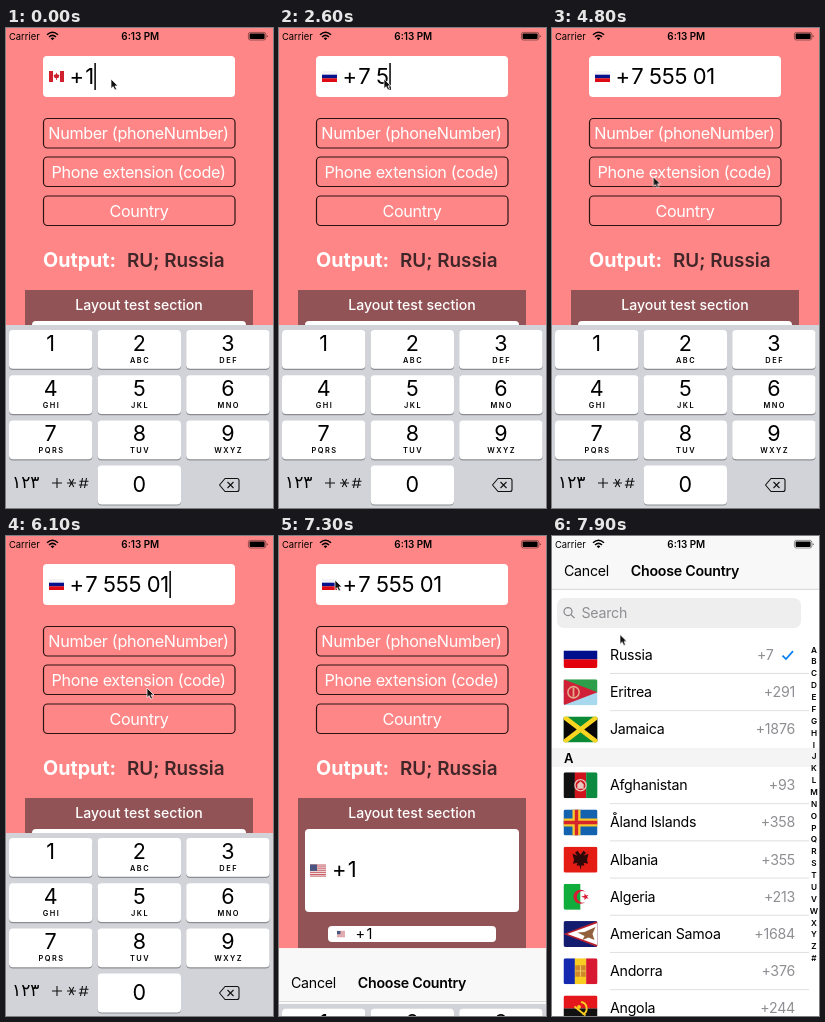
Write an HTML page that moves like this. It is 267 by 480 pixels and loops after 8000 ms.

```html
<!DOCTYPE html>
<html lang="en">
<head>
<meta charset="utf-8">
<title>Phone field</title>
<style>
html, body { margin: 0; width: 100%; height: 100%; overflow: hidden; background: #ff8686; }
svg { display: block; width: 100vw; height: 100vh; }
text { font-family: Inter, Roboto, sans-serif; white-space: pre; }
.mid { text-anchor: middle; }
.end { text-anchor: end; }
.b { font-weight: 600; }
.btn { font-size: 16.2px; letter-spacing: -.35px; fill: #fff; }
.num { font-size: 22px; letter-spacing: -.4px; }
.bar, .row { font-size: 14.2px; letter-spacing: -.25px; }
.code { fill: #8e8e93; }
.key { font-size: 21.5px; }
.abc { font-size: 7.4px; font-weight: 600; letter-spacing: 1.5px; }
.idx { font-size: 8.2px; font-weight: 600; }
#mouse { animation: roam 8s infinite ease-in-out; }
@keyframes roam {
  0%, 43.75% { transform: translate(105px, 51px); }
  51.25% { transform: translate(107px, 106px); }
  58.75% { transform: translate(101px, 146px); }
  65%, 68.75% { transform: translate(105px, 180px); }
  76.25%, 79% { transform: translate(141px, 152px); }
  86.25%, 93.75% { transform: translate(56px, 44px); }
  98.5%, 100% { transform: translate(68px, 98.5px); }
}
</style>
</head>
<body>
<svg viewBox="0 0 267 480" preserveAspectRatio="none">
  <defs>
    <clipPath id="flagClip"><rect width="34" height="26" rx="2"/></clipPath>
    <g id="usa">
      <rect width="16" height="12" fill="#f3eeee"/>
      <path d="M0 .5H16M0 2.4H16M0 4.3H16M0 6.2H16M0 8.1H16M0 10H16M0 11.6H16" stroke="#c8525a" stroke-width=".9"/>
      <rect width="7" height="6.4" fill="#4a5580"/>
    </g>
  </defs>

  <rect width="267" height="480" fill="#ff8686"/>
  <rect x="37" y="28" width="192" height="41" rx="4" fill="#fff"/>
  <g id="canada" transform="translate(43 43)">
    <rect width="15" height="11" fill="#fff"/>
    <path d="M0 0H4V11H0ZM11 0H15V11H11ZM7.5 1.5L8.4 3.4 10.4 4 9.6 6.8 7.9 7.2V9H7.1V7.2L5.4 6.8 4.6 4 6.6 3.4Z" fill="#d0202e"/>
  </g>
  <g id="russia" transform="translate(43 43)">
    <rect width="15" height="11" fill="#f4f4f6"/>
    <rect y="3.7" width="15" height="3.7" fill="#06128c"/>
    <rect y="7.3" width="15" height="3.7" fill="#e00a14"/>
  </g>
  <text id="typed" class="num" x="63.5" y="56"></text>
  <rect id="caret" y="35" width="1.6" height="27" fill="#111"/>

  <g fill="none" stroke="#2a1414" stroke-width="1.2">
    <rect x="37.5" y="90.5" width="191.5" height="29.5" rx="4"/>
    <rect x="37.5" y="129" width="191.5" height="29.5" rx="4"/>
    <rect x="37.5" y="168" width="191.5" height="29.5" rx="4"/>
  </g>
  <text class="btn mid" x="132.5" y="111">Number (phoneNumber)</text>
  <text class="btn mid" x="132.5" y="150">Phone extension (code)</text>
  <text class="btn mid" x="133" y="189">Country</text>
  <text x="37" y="239" font-size="19.7" font-weight="700" fill="#fff">Output:</text>
  <text class="b" x="121" y="239" font-size="18.9" fill="#402628">RU; Russia</text>

  <rect x="19" y="262" width="228" height="218" fill="#925356"/>
  <text class="mid" x="133" y="282" font-size="14.1" font-weight="500" fill="#fff">Layout test section</text>
  <rect x="26" y="293" width="214" height="83" rx="4" fill="#fff"/>
  <use href="#usa" x="31" y="328.5"/>
  <text class="num" x="53" y="341">+&#x200A;1</text>
  <rect x="49" y="390" width="168" height="16" rx="4" fill="#fff"/>
  <use href="#usa" transform="translate(58 395) scale(.5)"/>
  <text x="76.5" y="403" font-size="14.5">+&#x200A;1</text>

  <g id="sheet">
    <rect width="267" height="560" fill="#fff"/>
    <g id="rows"></g>
    <g id="index"></g>
    <rect width="267" height="53" fill="#f8f8f8"/>
    <path d="M0 53.3H267" stroke="#c4c4c6" stroke-width=".7"/>
    <text class="bar" x="12" y="40">Cancel</text>
    <text class="bar b mid" x="133" y="40">Choose Country</text>
    <rect x="5" y="62" width="244" height="30" rx="7" fill="#eeeeef"/>
    <g fill="none" stroke="#85858a" stroke-width="1.2"><circle cx="16" cy="75.5" r="4"/><path d="M19 78.5L22.5 82"/></g>
    <text class="bar code" x="29.5" y="82">Search</text>
  </g>

  <g id="keyboard">
    <rect y="297" width="267" height="184" fill="#d2d3d9"/>
    <g id="keys"></g>
    <text x="6" y="460" font-size="17" style="font-family:'DejaVu Sans',sans-serif">١٢٣</text>
    <g fill="none" stroke="#111" stroke-width="1.1">
      <path d="M46 455H56M51 450V460M61 455H70M63.2 451L67.8 459M67.8 451L63.2 459M76.5 450L74.5 460M80.5 450L78.5 460M73.5 453.3H82.5M72.8 457H81.8"/>
      <path d="M219 450.5H231Q233 450.5 233 452.5V461.5Q233 463.5 231 463.5H219L213.5 457ZM221.5 454L227.5 460M227.5 454L221.5 460" stroke-linejoin="round"/>
    </g>
  </g>

  <g id="status">
    <text x="3" y="11.5" font-size="9.4">Carrier</text>
    <g fill="none" stroke="#000" stroke-width="1.5"><path d="M41 6.8Q46.5 1.8 52 6.8M43 9Q46.5 5.8 50 9"/></g>
    <path d="M44.6 10.3Q46.5 8.6 48.4 10.3L46.5 12.3Z"/>
    <text class="b mid" x="134.3" y="11.5" font-size="9.9">6:13 PM</text>
    <rect x="242.4" y="4.4" width="17.4" height="7.6" rx="2" fill="none" stroke="#000" stroke-width=".7" opacity=".6"/>
    <rect x="243.6" y="5.5" width="15" height="5.4" rx="1"/>
    <path d="M260.8 7Q262.6 8.2 260.8 9.4Z"/>
  </g>

  <g id="mouse"><path d="M0 0V9.6L2.2 7.6 3.8 11 5.6 10.2 4 6.9H7Z" fill="#111" stroke="#fff" stroke-width=".7"/></g>
</svg>
<script>
const LOOP = 8000;
const $ = id => document.getElementById(id);
const box = (x, y, w, h, c) => `<rect x="${x}" y="${y}" width="${w}" height="${h}" fill="${c}"/>`;
const shape = (d, c) => `<path d="${d}" fill="${c}"/>`;
const line = (d, c, w) => `<path d="${d}" fill="none" stroke="${c}" stroke-width="${w}"/>`;
const dot = (x, y, r, c) => `<circle cx="${x}" cy="${y}" r="${r}" fill="${c}"/>`;
const bands = (...cs) => cs.map((c, i) => box(0, i * 26 / cs.length, 34, 26 / cs.length + .1, c)).join('');
const poles = (...cs) => cs.map((c, i) => box(i * 34 / cs.length, 0, 34 / cs.length + .1, 26, c)).join('');

// Each flag fills 34 x 26.
const countries = [
  ['Russia', '+7', bands('#fff', '#00108c', '#e2000c')],
  ['Eritrea', '+291', bands('#2f9e4a', '#a8d8ee') + shape('M0 0L34 13 0 26Z', '#d02038') +
    `<circle cx="10" cy="13" r="5.6" fill="none" stroke="#e0a888" stroke-width="1.6"/>` + line('M10 8.5V17.5', '#e0a888', 1.8)],
  ['Jamaica', '+1876', box(0, 0, 34, 26, '#0a8a34') + shape('M0 0L17 13 0 26ZM34 0L17 13 34 26Z', '#080808') +
    line('M0 0L34 26M34 0L0 26', '#f8d520', 4.5)],
  ['Afghanistan', '+93', poles('#111', '#d0141c', '#0c8a40') +
    `<circle cx="17" cy="13" r="5.6" fill="none" stroke="#e8c8c0" stroke-width="1.3"/>` +
    shape('M13.8 16.5V12L17 9 20.2 12V16.5Z', '#e8c8c0')],
  ['Åland Islands', '+358', box(0, 0, 34, 26, '#1262b0') + line('M13 0V26M0 13H34', '#f8c828', 8) +
    line('M13 0V26M0 13H34', '#d4242c', 3.4)],
  ['Albania', '+355', box(0, 0, 34, 26, '#e41c14') +
    shape('M17 8L14 4 11.5 6 14 9 9 7 10.5 13 9.5 17 14 16 13 19 16 18.5 17 23 18 18.5 21 19 20 16 24.5 17 23.5 13 25 7 20 9 22.5 6 20 4Z', '#2c0808')],
  ['Algeria', '+213', poles('#10ac3c', '#fff') + shape('M22 8.2A7 7 0 1 0 22 17.8 5.6 5.6 0 1 1 22 8.2Z', '#d81c34') +
    shape('M17.5 13L21 12 21 9.5 22.7 11.6 25 11 23.5 13 25 15 22.7 14.4 21 16.5 21 14Z', '#d81c34')],
  ['American Samoa', '+1684', box(0, 0, 34, 26, '#141c70') + shape('M34 0V26L0 13Z', '#b8202c') +
    shape('M34 2V24L4 13Z', '#fff') + shape('M14 11.5L21 11 32 6 29 13 31 19 25 16.5 19 19 21 15Z', '#92603c')],
  ['Andorra', '+376', poles('#1428b0', '#f8cc20', '#d81830') + box(11.8, 7, 10.4, 11.5, '#d08828') +
    line('M17 7V18.5M11.8 12.7H22.2', '#f0c868', 1)],
  ['Angola', '+244', bands('#e4181c', '#111') + line('M17.5 6.5A6.5 6.5 0 0 1 19 19M11 11L22 20', '#f8cc20', 1.9) +
    dot(15.5, 11.5, 1.9, '#f8cc20')]
];

$('rows').innerHTML = box(0, 212, 267, 19, '#f4f4f5') + '<text class="b" x="12" y="226.5" font-size="13">A</text>' +
  countries.map(([name, code, flag], i) => {
    const y = 119 + i * 37.2 + (i > 2 ? 18.6 : 0);
    const rule = i === 2 ? '' : line(`M58 ${y + 18.4}H257`, '#d2d2d5', .7);
    return `<g transform="translate(11.5 ${y - 13})" clip-path="url(#flagClip)">${flag}</g>
      <text class="row" x="58" y="${y + 5}">${name}</text>
      <text class="row code end" x="${i ? 243 : 221.5}" y="${y + 5}">${code}</text>${rule}`;
  }).join('') + line('M230.5 119.5L234 123 241 115', '#0a80f0', 1.8);

$('index').innerHTML = [...'ABCDEFGHIJKLMNOPQRSTUVWXYZ#'].map((c, i) =>
  `<text class="idx mid" x="262" y="${116.5 + i * 11.87}">${c}</text>`).join('');

const letters = ['', 'ABC', 'DEF', 'GHI', 'JKL', 'MNO', 'PQRS', 'TUV', 'WXYZ'];
const keyCap = (col, row, digit, abc) => {
  const x = 3 + col * 88.6, y = 302 + row * 45.2, mid = x + 41.7;
  return `<rect x="${x}" y="${y + 1}" width="83.4" height="39" rx="4" fill="#8c8d92"/>
    <rect x="${x}" y="${y}" width="83.4" height="38.8" rx="4" fill="#fff"/>
    <text class="key mid" x="${mid}" y="${y + (digit ? 21 : 26.5)}">${digit}</text>
    <text class="abc mid" x="${mid + .8}" y="${y + 33}">${abc}</text>`;
};
$('keys').innerHTML = letters.map((abc, i) => keyCap(i % 3, Math.floor(i / 3), i + 1, abc)).join('') + keyCap(1, 3, 0, '');

// [start ms, field text]
const typing = [
  [0, '+1'], [100, '+1 5'], [200, '+1 55'], [300, '+1 555'], [350, '+1 555 0'], [400, '+1 555 01'],
  [1200, '+1 555 0'], [1400, '+1 555'], [1580, '+1 55'], [1660, '+1 5'], [1730, '+1'], [1800, '+'],
  [2100, '+7'], [2600, '+7 5'], [2800, '+7 55'], [2900, '+7 555'], [3100, '+7 555 0'], [3300, '+7 555 01']
];
const solid = [[0, 450], [1200, 2400], [2600, 3450]];
const HIDE = 7065, SHOW = 7265;
const clamp = v => Math.min(1, Math.max(0, v));

// Critically damped spring, 0 to 1.
const spring = ms => {
  const s = Math.max(0, ms) * .018257;
  return 1 - (1 + s) * Math.exp(-s);
};

function caretAlpha(t) {
  if (t >= HIDE) return 0;
  if (solid.some(([a, b]) => t >= a && t < b)) return 1;
  const p = (t + 900) % 1000;
  return p < 400 ? 1 : p < 700 ? 1 - (p - 400) / 300 : clamp((p - 800) / 200);
}

function draw() {
  const t = performance.now() % LOOP;
  // A hair space loosens the plus sign.
  const value = typing.filter(([at]) => at <= t).pop()[1].replace('+', '+\u200A');
  const typed = $('typed');
  if (typed.textContent !== value) typed.textContent = value;
  $('caret').setAttribute('x', 64 + typed.getComputedTextLength());
  $('caret').setAttribute('opacity', caretAlpha(t));
  $('canada').setAttribute('visibility', t < 1800 ? 'visible' : 'hidden');
  $('russia').setAttribute('visibility', t >= 2100 ? 'visible' : 'hidden');
  $('keyboard').setAttribute('transform', `translate(0 ${184 * spring(t - HIDE)})`);
  $('sheet').setAttribute('transform', `translate(0 ${480 * (1 - spring(t - SHOW))})`);
  requestAnimationFrame(draw);
}
draw();
</script>
</body>
</html>
```
